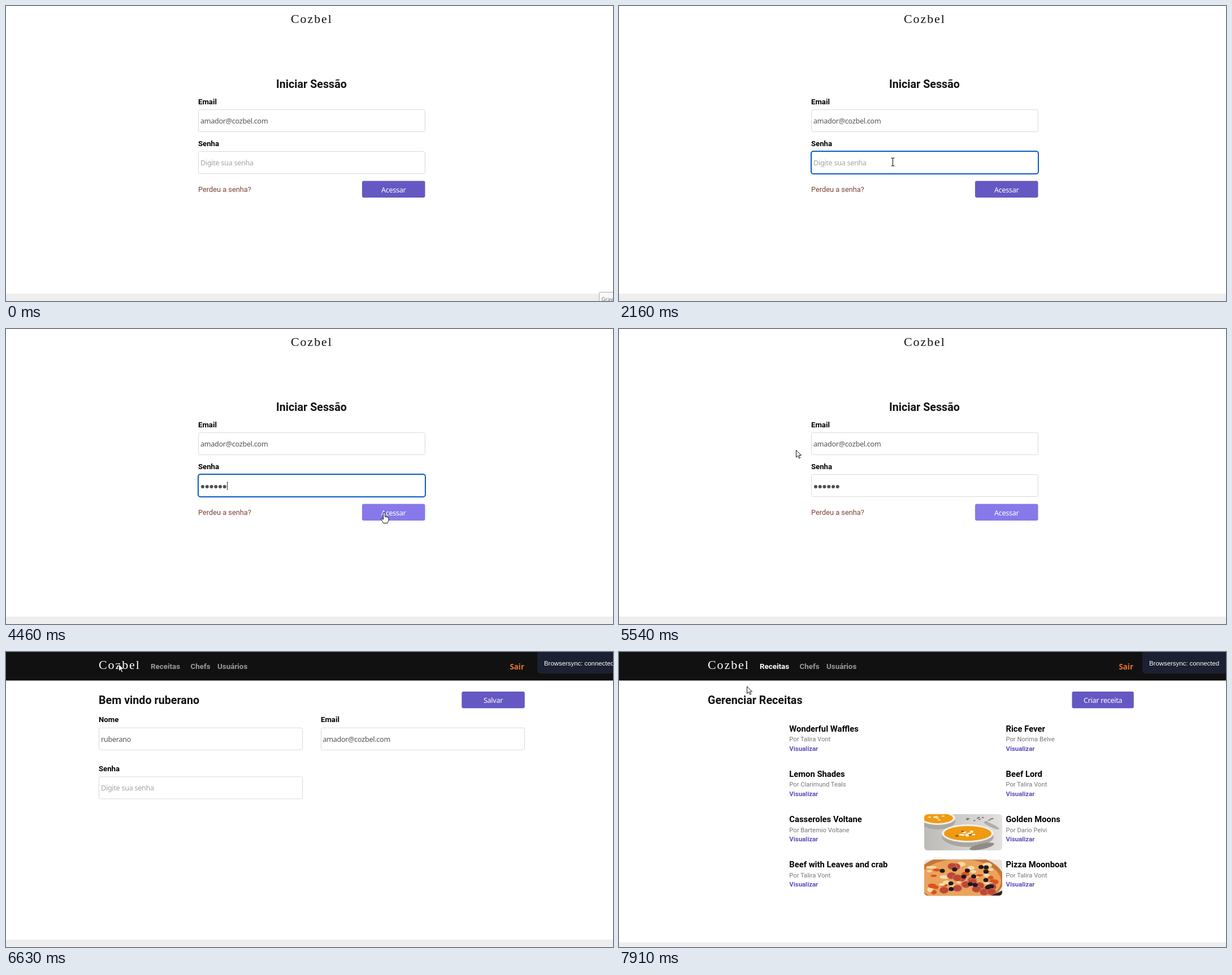
An HTML page for the animation above (7.99 s loop, 1074 px wide and 522 px high).

```html
<!DOCTYPE html>
<html lang="pt">
<head>
<meta charset="utf-8">
<style>
html, body { margin: 0; width: 100%; height: 100%; overflow: hidden; background: #fff; }
svg { display: block; }
text { font: 12.8px Roboto, sans-serif; fill: #000; }
.logo { font: 22px "Liberation Serif", serif; letter-spacing: 1.9px; fill: #111; }
.title { font-size: 19.7px; font-weight: 600; fill: #111; }
.label { font-size: 13.2px; font-weight: 600; }
.nav { font-size: 13.4px; font-weight: 600; fill: #9c999c; }
.exit { font: bold 13.3px "Noto Sans", sans-serif; fill: #e8722f; }
.value, .hint, .btn { font: 12.6px "Noto Sans", sans-serif; letter-spacing: -.28px; fill: #555; }
.hint { fill: #a4a4a4; }
.btn { fill: #fff; text-anchor: middle; }
.lost { fill: #7c4237; }
.dish { font-size: 14.8px; font-weight: 600; }
.by { font-size: 11.2px; fill: #777; }
.view { font-size: 11.4px; font-weight: 600; fill: #5a4fbb; }
.note { font: 11.4px "Liberation Sans", sans-serif; fill: #fff; }
.tip { font: 9.5px "Noto Sans", sans-serif; fill: #777; }
.white { fill: #fff; }
.line { fill: none; stroke: #111; stroke-width: 1.1; }
.arrow { fill: #fff; stroke: #111; stroke-width: 1; stroke-linejoin: round; }
</style>
</head>
<body>
<svg id="stage" width="1074" height="522" viewBox="0 0 1074 522"></svg>
<script>
const LOOP = 7990, PURPLE = '#6558c3', PURPLE_HOVER = '#8779ea';
const BRAND = 'Cozbel', USER = 'ruberano', MAIL = 'amador@cozbel.com';

const text = (cls, x, y, s) => `<text class="${cls}" x="${x}" y="${y}">${s}</text>`;
const rect = (x, y, w, h, fill, more = '') =>
  `<rect x="${x}" y="${y}" width="${w}" height="${h}" fill="${fill}" ${more}/>`;
const oval = (x, y, rx, ry, fill, more = '') =>
  `<ellipse cx="${x}" cy="${y}" rx="${rx}" ry="${ry}" fill="${fill}" ${more}/>`;
const group = (id, s, more = '') => `<g id="${id}" ${more}>${s}</g>`;
const field = (x, y, w) => rect(x + .5, y + .5, w, 39, '#fff', 'rx="3" stroke="#dadada"');
const button = (x, y, w, s, id = '') =>
  rect(x, y, w, 29.5, PURPLE, `rx="3" id="${id}"`) + text('btn', x + w / 2, y + 20, s);
const toast = x => rect(x, -6, 200, 44, '#1b2032', 'rx="5"') +
  text('note', x + 12, 23.5, 'Browsersync: connected');

function header(x, h, logo, active) {
  const y = h - 20.3, nav = x + (logo ? 92 : 19);
  return rect(0, 0, 1074, h, '#111') +
    (logo ? text('logo white', x, 30, BRAND) : '') +
    text('nav' + (active ? ' white' : ''), nav, y, 'Receitas') +
    text('nav', nav + 70.5, y, 'Chefs') +
    text('nav', nav + 118, y, 'Usuários') +
    text('exit', x + 727.5, y + .5, 'Sair');
}

const dishes = [
  ['Wonderful Waffles', 'Talira Vont', '1635013738544-brun-ti'],
  ['Rice Fever', 'Norima Belve', '1635013936958-tom-vel'],
  ['Lemon Shades', 'Clarimund Teals', '1635014074588-olav-re'],
  ['Beef Lord', 'Talira Vont', '1635014625679-ivor-se'],
  ['Casseroles Voltane', 'Bartemio Voltane', '1635014939968-ruan-ki'],
  ['Golden Moons', 'Dario Pelvi', '1635015046148-mila-vo'],
  ['Beef with Leaves and crab', 'Talira Vont', '1635015251996-ulm-tar'],
  ['Pizza Moonboat', 'Talira Vont', '1635015375701-dorell']
];

function recipes(loaded) {
  const x = loaded ? 157 : 164, y = loaded ? 5.7 : 0;
  return header(x, loaded ? 50.5 : 44.8, loaded, true) +
    text('title', x, 86 + y, 'Gerenciar Receitas') +
    button(x + 644.5, 64.3 + y, 109.3, 'Criar receita') +
    dishes.map(([name, cook, file], i) => {
      const left = x + i % 2 * 383.2, top = y + (i >> 1) * 80.2;
      const alt = `<svg x="${left + 3}" y="${120 + top}" width="132" height="40">` +
        text('', 0, 16.5, 'Image of') + text('', 0, 31.5, file) + '</svg>';
      return (loaded ? '' : alt) +
        text('dish', left + 144.3, 135 + top, name) +
        text('by', left + 144.3, 152.5 + top, 'Por ' + cook) +
        text('view', left + 144.3, 169 + top, 'Visualizar');
    }).join('');
}

// Small seeded generator for the food pictures
let seed = 7;
const rnd = (a, b) => a + (b - a) * ((seed = seed * 16807 % 2147483647) / 2147483647);
const scatter = (n, make) => Array.from({ length: n }, make).join('');
const photo = (y, s) => `<g transform="translate(540 ${y})" clip-path="url(#round)">${s}</g>`;

function soup() {
  const bowl = (x, y, rx, ry) => oval(x, y + 5, rx, ry + 3, '#aaa7a2') +
    oval(x, y, rx, ry, '#f3efe8') + oval(x, y, rx - 4, ry - 3, '#f09a12');
  return rect(0, 0, 138, 64, 'url(#table)') + bowl(24, 7, 31, 12) + bowl(77, 34, 46, 16) +
    scatter(14, () => oval(rnd(58, 90), rnd(29, 39), 3, 1.5, rnd(0, 1) > .3 ? '#fff0d4' : '#9c5a18')) +
    scatter(8, () => oval(rnd(8, 36), rnd(3, 11), 2.5, 1.3, '#fbe3b6')) +
    scatter(12, () => oval(rnd(52, 125), rnd(3, 15), 2, 1, '#77736c')) +
    oval(102, 57, 22, 5, '#8e8c84', 'transform="rotate(-12 102 57)"') +
    oval(119, 20, 15, 3, '#b0aeaa', 'transform="rotate(25 119 20)"');
}

function pizza() {
  const spot = () => [rnd(8, 124), rnd(8, 58)];
  return rect(0, 0, 138, 64, '#e5e3e2') + oval(63, 35, 78, 44, '#c87535') +
    oval(63, 38, 73, 39, '#e9a35d') +
    scatter(34, () => oval(...spot(), rnd(4, 9), rnd(2, 5), rnd(0, 1) > .5 ? '#f6d9a5' : '#d9531f')) +
    scatter(15, () => oval(...spot(), 8, 6, '#bd4735', 'stroke="#d98260"')) +
    scatter(16, () => oval(...spot(), 4.5, 3.5, '#1d1b20')) +
    '<path d="M118 64l20-9v9z" fill="#33231f"/>';
}

const login = text('logo', 504, 30, BRAND) +
  text('title', 478, 145, 'Iniciar Sessão') +
  text('label', 340, 174, 'Email') + field(340, 183, 401) + text('value', 344, 208, MAIL) +
  text('label', 340, 248, 'Senha') + field(340, 257, 401) +
  group('focus', rect(340, 257, 402, 40, '#fff', 'rx="4" stroke="#0b5ac8" stroke-width="2"')) +
  group('hint', text('hint', 344, 282, 'Digite sua senha')) +
  [0, 1, 2, 3, 4, 5].map(i => group('dot' + i, oval(348 + 7.75 * i, 279, 3, 3, '#505050'))).join('') +
  rect(0, 270, 1, 15, '#222', 'id="caret"') +
  text('lost', 340, 328.5, 'Perdeu a senha?') +
  button(630, 309.5, 111.5, 'Acessar', 'enter') +
  group('tip', rect(1049.5, 506.5, 40, 30, '#f8f8f8', 'stroke="#aaa" rx="1"') +
    text('tip', 1053.5, 521.5, 'Gravar'));

const profile = header(164, 50.5, true, false) +
  text('title', 164, 91.7, 'Bem vindo ' + USER) + button(806.3, 70, 111.5, 'Salvar') +
  text('label', 164, 124.3, 'Nome') + field(164, 133.7, 360) + text('value', 168, 158.7, USER) +
  text('label', 557, 124.3, 'Email') + field(557, 133.7, 360) + text('value', 560.5, 158.7, MAIL) +
  text('label', 164, 211, 'Senha') + field(164, 220.3, 360) + text('hint', 168, 245.3, 'Digite sua senha');

stage.innerHTML = `<defs><clipPath id="round"><rect width="138" height="64" rx="6"/></clipPath>
  <linearGradient id="table"><stop stop-color="#bdbbb8"/><stop offset="1" stop-color="#e2e1e0"/></linearGradient></defs>` +
  rect(0, 509, 1074, 13, '#eee', 'id="bar"') +
  group('login', login) + group('profile', profile) + group('toast', toast(940)) +
  group('loading', recipes(false)) +
  group('loaded', recipes(true) + toast(926)) +
  group('photos', photo(287, soup()) + photo(367.3, pizza())) +
  group('pointer',
    group('arrow', '<path class="arrow" d="M.5.5V13l3-2.8 2.2 4.7 2-1-2.2-4.4h4z"/>') +
    group('beam', '<path class="line" d="M-3-7h2l1 1 1-1h2M0-6V6M-3 7h2l1-1 1 1h2"/>') +
    group('hand', '<path class="arrow" d="M-1.5 1a1.5 1.5 0 0 1 3 0V7l4.5 1q2 .5 2 2.5v3l-2 5h-7l-4-6q-.8-2 1-2l2.5 1.5z"/>'));

const $ = id => document.getElementById(id);
const show = (id, on) => $(id).style.display = on ? '' : 'none';
const within = (t, a, b) => t >= a && t < b;

// Pointer stops: time, x, y
const path = [
  [70, 1064, 512], [300, 820, 430], [560, 588, 326], [820, 510, 307], [960, 478, 287],
  [1230, 478, 287], [1300, 480, 282], [1700, 484.5, 276], [3700, 484.5, 276], [3900, 528, 298],
  [4150, 632, 320], [4400, 669, 325], [4465, 669, 325], [4530, 668, 316], [4590, 662, 316],
  [4930, 662, 316], [5200, 308, 205], [5270, 313, 214], [5700, 313, 214], [6000, 240, 105],
  [6290, 196, 40], [6630, 199, 21], [7645, 199, 21], [7900, 226, 60.5], [LOOP, 226, 60.5]
];

function pointerAt(t) {
  const i = Math.max(1, path.findIndex(p => p[0] >= t));
  const [t0, x0, y0] = path[i - 1], [t1, x1, y1] = path[i];
  const k = Math.max(0, (t - t0) / (t1 - t0));
  return [x0 + (x1 - x0) * k, y0 + (y1 - y0) * k];
}

const keys = [2360, 2560, 2760, 2950, 3160, 3300];

function draw(t) {
  const typed = keys.filter(k => t >= k).length;
  show('login', t < 5610);
  show('profile', within(t, 5610, 7570));
  show('toast', within(t, 5675, 7570));
  show('loading', within(t, 7570, 7775));
  show('loaded', t >= 7775);
  show('photos', t >= 7845);
  $('bar').setAttribute('y', t < 7775 ? 509 : 513.5);

  show('tip', t < 70);
  show('focus', within(t, 1630, 5540));
  show('hint', !typed);
  for (let i = 0; i < 6; i++) show('dot' + i, i < typed);
  show('caret', within(t, 1630, 2160) || within(t, 2360, 3830) || within(t, 4420, 4990));
  $('caret').setAttribute('x', 345 + 7.7 * typed);
  $('enter').setAttribute('fill', t < 4150 ? PURPLE : PURPLE_HOVER);

  const beam = within(t, 1290, 3890), hand = within(t, 4150, 4990);
  show('pointer', t >= 70);
  show('beam', beam);
  show('hand', hand);
  show('arrow', !beam && !hand);
  $('pointer').setAttribute('transform', `translate(${pointerAt(t)})`);
}

const start = performance.now();
(function tick() {
  draw((performance.now() - start) % LOOP);
  requestAnimationFrame(tick);
})();
</script>
</body>
</html>
```
